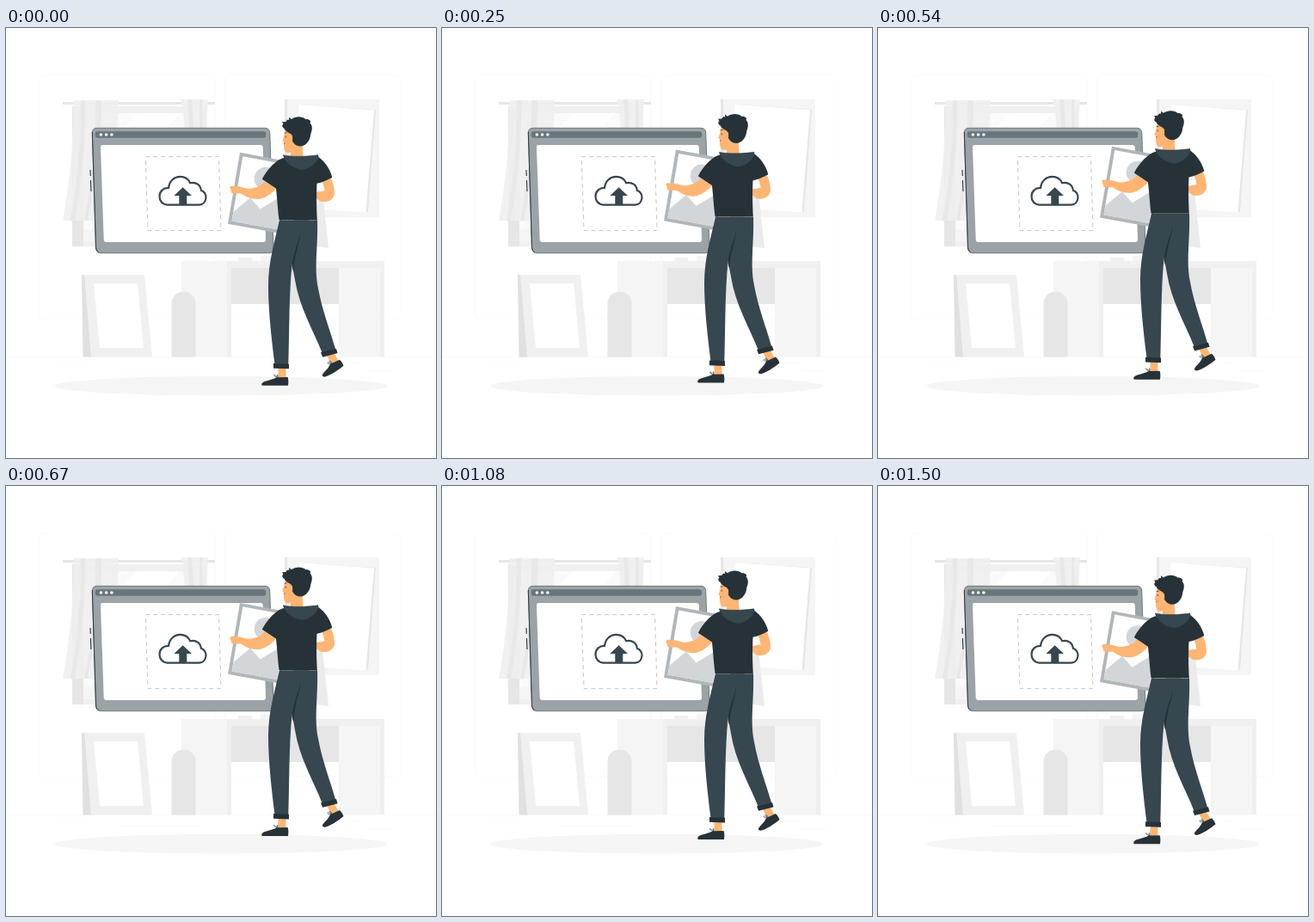
An HTML page with a canvas for the animation above (1.54 s loop, 500 by 500 pixels).

```html
<!DOCTYPE html>
<html lang="en">
<head>
<meta charset="utf-8">
<title>Image upload</title>
<style>
html, body { margin: 0; width: 100%; height: 100%; overflow: hidden; background: #fff; }
canvas { display: block; width: 100vw; height: 100vh; }
</style>
</head>
<body>
<canvas id="stage" width="500" height="500"></canvas>
<script>
const ctx = document.getElementById('stage').getContext('2d');
const LOOP = 1540, FRAME = 1000 / 24;
const DARK = '#263238', SLATE = '#37474f', SKIN = '#ffb573';

function fill(color, d) {
  ctx.fillStyle = color;
  ctx.fill(new Path2D(d));
}

function line(color, width, d) {
  ctx.strokeStyle = color;
  ctx.lineWidth = width;
  ctx.stroke(new Path2D(d));
}

function rect(color, x, y, w, h) {
  ctx.fillStyle = color;
  ctx.fillRect(x, y, w, h);
}

function dot(color, x, y, r) {
  ctx.fillStyle = color;
  ctx.beginPath();
  ctx.arc(x, y, r, 0, Math.PI * 2);
  ctx.fill();
}

function drawRoom() {
  rect('#fff', 0, 0, 500, 500);
  for (const x of [38.3, 254.6]) {
    ctx.strokeStyle = '#ebebeb';
    ctx.lineWidth = 0.25;
    ctx.beginPath();
    ctx.roundRect(x, 55.1, 204.3, 282.6, 5.6);
    ctx.stroke();
  }
  rect('#ebebeb', 0, 382.4, 500, 0.25);
  for (const [x, y, w] of [[416.8, 398.5, 33], [322.5, 401.2, 8.7], [396.6, 389.2, 19.2],
    [52.5, 390.9, 43.2], [104.6, 390.9, 6.3], [131.5, 395.1, 93.7]]) {
    rect('#ebebeb', x, y, w, 0.25);
  }
}

function drawWindow() {
  rect('#f0f0f0', 77, 91, 157, 163);
  rect('#e6e6e6', 77, 91, 13, 163);
  rect('#fafafa', 90, 99, 136, 135);
  fill('#fff', 'M153 99H202L184 120H132Z');
  rect('#f5f5f5', 90, 234, 14, 14);
  rect('#e6e6e6', 66, 86, 177, 3);
  ctx.globalAlpha = 0.9;
  fill('#f0f0f0', 'M78 84H131C131 130 119 185 106 224H66C74 180 79 130 78 84Z');
  fill('#f0f0f0', 'M203 83H235C234 100 233 112 234 140H208C208 115 207 100 203 83Z');
  ctx.globalAlpha = 1;
  fill('#e8e8e8', 'M87 84H92C93 135 87 185 80 224H75C83 180 88 130 87 84Z');
  fill('#e8e8e8', 'M104 84H111C111 135 103 185 95 224H91C100 180 105 130 104 84Z');
  fill('#e8e8e8', 'M211 83H216L219 130H214ZM225 83H228L229 130H225Z');
}

function drawPoster() {
  rect('#f5f5f5', 324, 83, 110, 137);
  rect('#e6e6e6', 324, 83, 3, 137);
  fill('#e6e6e6', 'M341 89L430 95L421 214L414 214Z');
  fill('#fff', 'M341 89L428 95.5L418.5 214.5L331 208Z');
  fill('#ebebeb', 'M361 188L368 190L375 256L361 254Z');
}

function drawDesk() {
  rect('#f5f5f5', 204, 271, 54, 111.4);
  rect('#f0f0f0', 257, 271, 183, 8);
  rect('#f0f0f0', 257, 279, 5, 103.4);
  rect('#e6e6e6', 262, 279, 125, 42);
  rect('#f5f5f5', 387, 279, 48, 103.4);
  rect('#f0f0f0', 435, 279, 5, 103.4);
  fill('#f0f0f0', 'M269 271L271 267H285L287 271Z');
  rect('#f5f5f5', 296, 265, 14, 6);
  fill('#e6e6e6', 'M192.5 382.4V320.5A14 14 0 0 1 220.5 320.5V382.4Z');
  fill('#e0e0e0', 'M88 287H93L101 382.4H89.5Z');
  fill('#f0f0f0', 'M91 287H161L170 382.4H99Z');
  fill('#fff', 'M102 297H153L160 372H109Z');
  ctx.fillStyle = '#f5f5f5';
  ctx.beginPath();
  ctx.ellipse(250, 416.2, 193.9, 11.3, 0, 0, Math.PI * 2);
  ctx.fill();
}

function drawTablet() {
  const body = 'M106 116.3H301Q306.5 116.3 306.8 122L311 256Q311 261.7 305.5 261.7H111Q105 261.7 104.6 256L100.3 122Q100.3 116.3 106 116.3Z';
  fill('#9ba3a7', body);
  line('#59666c', 0.8, body);
  line(DARK, 0.9, 'M100.3 121L104.5 256Q105 259.5 108 261.2');
  line(DARK, 1.1, 'M98 165L98.3 172M98.4 177L99 190');
  fill('#68757b', 'M106 120.2H299Q302 120.2 302.2 123V125Q302 127.7 299.5 127.7H106.5Q104 127.7 103.8 125V123Q103.8 120.2 106 120.2Z');
  for (const x of [110.4, 116.6, 122.9]) dot('#fff', x, 124, 1.8);
  fill('#fff', 'M112 136H296Q298.6 136 298.8 139L302 246Q302 249 299 249H116.5Q114 249 113.7 246L110 139Q110 136 112 136Z');

  ctx.setLineDash([5, 4]);
  line('#c7c7c7', 1, 'M162.2 149.6H247.5L250 235.6H165Z');
  ctx.setLineDash([]);
  line(SLATE, 2.2, 'M187.5 205.6C181.5 205 178.5 200.5 178.5 195.7C178.5 189.5 183.5 185.6 189 185.9C190 177.5 196 172.8 202.5 172.9C208 173 212.2 175.8 214.2 180.2C221 178.5 226.5 183 226.8 188.8C230.7 190.4 232.6 193.5 232.5 197.3C232.2 202 229 205.4 224.5 205.6Z');
  fill(SLATE, 'M205.6 185.3L216 195H210.3V205H201.3V195H195.4Z');
}

function drawPicture() {
  fill('#b0b6b9', 'M272 145.2L333 156.5L318.5 239L258 228Z');
  fill('#fff', 'M275.3 149.6L329 159.5L315.6 234.5L262.5 224.8Z');
  dot('#d3d6d8', 302, 175.5, 13.3);
  fill('#d3d6d8', 'M264.5 214L284 197.8L295.5 210.8L320 196L315.6 234.5L262.5 224.8Z');
}

function drawLegs() {
  fill(SKIN, 'M316.5 395H325.5V409H316.5ZM373 381L381 377L387 388L379 392Z');
  fill(SLATE, 'M335 223.5H362C363 255 358 278 363 303C368 330 377 352 383.5 375L368 379C357 351 341 325 336 293L331 266Z');
  fill(SLATE, 'M318 223.5H352C347 246 335 263 332.5 276C329 310 329.5 355 328.3 391.5H312.5C309 364 305 330 305 300C305 272 312 250 318 223.5Z');
  fill(DARK, 'M342.5 238C341 251 336 263 333.8 283L332.5 277C334 262 339 252 342.5 238Z');
  fill(DARK, 'M311 390.3L329 391V396.7L311 396Z');
  fill(DARK, 'M366 377.7L384 373.3L385.6 378.4L368.2 383Z');
  fill(DARK, 'M297.2 415.2C296.8 410.5 306 411 315 406.5L327.5 406.3C328.6 409 328.5 412 328 416.2H298Z');
  fill(DARK, 'M368.2 405.3C366.5 401.5 373.5 399.5 377 391.2L388 386.2C390 387.8 391.5 390.5 392.5 393.2C386 398.5 378 404 370.5 406Z');
  line(DARK, 0.6, 'M315 407C310 404 311 402.5 313 404.5L316 407C314 402 316.5 402 316 407M378 391C373 391 373 388.5 375.5 389L379 391C374.5 387 376.5 385.5 379 390');
}

function drawTorso() {
  fill(SKIN, 'M367 178L378 175C381 182 382.2 188 382 193C381 200 374 203.5 366 202L360.5 198V191.2C364 190.6 368 190.5 370.5 189.5C370 186 369 182 367 178Z');
  fill(DARK, 'M324 151C315 152.5 304 164 297.8 176L314 187C315.5 200 316 213 317.5 223.3H361.8C361 207 360.8 195 361.5 181C367 180 374 177 379.3 174C377 164 370 154.5 363 150Z');
  fill(SKIN, 'M301 178.5C296 184.5 288 187.3 280 187L271 184.5L262 184C260 184.5 260.2 186 261 187.5L262.5 192.5L273 192.7C280 198 289 200.2 296 199C303 197 310 191.5 314 187Z');
  fill(SKIN, 'M331 136L344.5 132L345.5 150Q338 157 331 150Z');
  fill(SLATE, 'M322 148C334 150.5 352 149.5 363 148C365 153 356 164 344 165C333 163.5 324 156 322 148Z');
  line(DARK, 0.5, 'M322 148C334 150.5 352 149.5 363 148');
}

function drawHead() {
  fill(SKIN, 'M326 116C323.8 120 323.7 124 323.2 126L321.4 131.8L323.2 133.2C322.5 140 323.5 145.8 328 145.7C336 145 342 141 343 132L337 117Z');
  fill('#ff5652', 'M322.9 133.8L325.3 133.4L323 136Z');
  line(DARK, 0.8, 'M325.2 126V128M323.7 122.5L326.6 122');
  fill(DARK, 'M331.5 123.5C328 122 324.5 120 323.5 117C320.5 115.5 321 112.5 322.5 112L321 109.5L325.5 109.3C326.5 106.5 328 107 329.2 107.2L329 104.2L332 106.4C337 102.8 344.5 102.8 348.5 106.5C352.5 106 355.5 109 353.5 110.5C357.5 115 355.5 120 354.2 124C353.8 130.5 349 137.8 342 137.8C337 137.4 333.5 134 332.3 129.5Z');
  fill(SKIN, 'M333 125.2C329.5 123.2 327.7 125.2 328.5 128.5C329.5 131.7 332 132 333.2 130.5Z');
}

// Linear rise of 10 px and linear fall, then a short rest before the loop restarts.
function lift(t) {
  return Math.max(0, Math.min(t + 26, 1474 - t) / 75);
}

function draw(now) {
  const t = now % LOOP;
  const held = Math.floor((t + 4) / FRAME) * FRAME;
  const scale = devicePixelRatio || 1;
  const size = Math.round(500 * scale);
  if (ctx.canvas.width !== size) ctx.canvas.width = ctx.canvas.height = size;
  ctx.setTransform(scale, 0, 0, scale, 0, 0);
  drawRoom();
  drawWindow();
  drawPoster();
  drawDesk();
  drawTablet();
  ctx.translate(0, -lift(Math.min(held, 36 * FRAME)));
  drawPicture();
  drawLegs();
  drawTorso();
  drawHead();
}

const start = performance.now();
function tick() {
  draw(performance.now() - start);
  requestAnimationFrame(tick);
}
tick();
</script>
</body>
</html>
```
